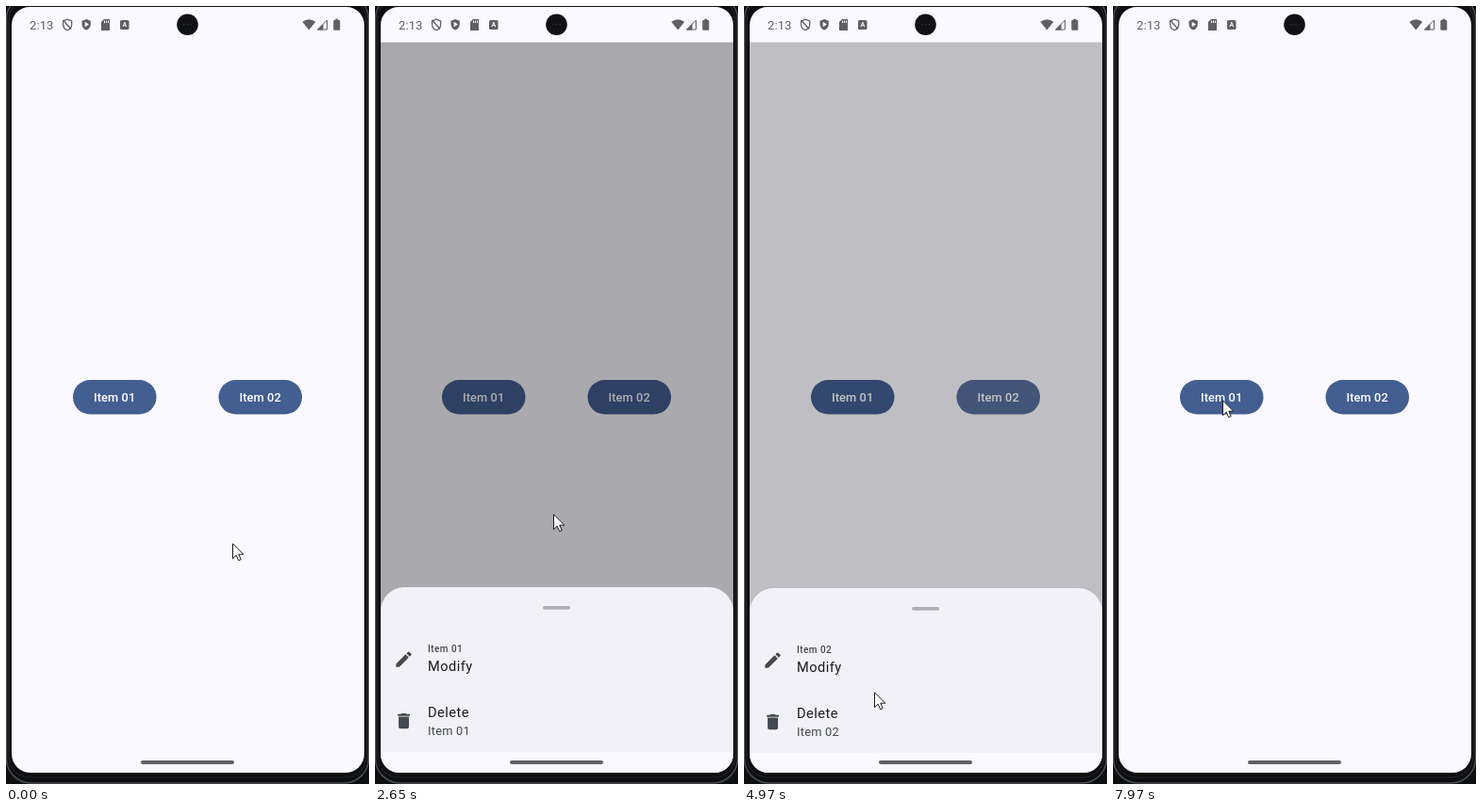
Recreate the animation shown at these times as an HTML page with a canvas. Size 385 by 826 pixels, loop 8000 ms.

```html
<!DOCTYPE html>
<html lang="en">
<head>
<meta charset="utf-8">
<title>Bottom sheet demo</title>
<style>
  html, body { margin: 0; width: 385px; height: 826px; overflow: hidden; background: #0d0e10; }
  canvas { display: block; }
</style>
</head>
<body>
<canvas id="stage" width="385" height="826"></canvas>
<script>
const ctx = document.getElementById('stage').getContext('2d');
const LOOP = 8000;
const BG = '#faf9ff', GREY = '#5f5f64', INK = '#1a1b20', SOFT = '#44474f';
const SHEET_TOP = 617, SHEET_OUT = 826, SHEET_H = 175;

// Pointer tip: time, x, y
const path = [
  [370, 240, 570], [1170, 162, 442], [1290, 151, 430], [1560, 119, 418],
  [2060, 119, 418], [2650, 189, 539], [3330, 189, 539], [3510, 214, 502],
  [3980, 259, 420], [4640, 259, 420], [4970, 138, 728], [5230, 92, 738],
  [5770, 82, 706], [6250, 194, 561], [6450, 194, 561], [7050, 182, 539],
  [7510, 182, 539], [7970, 116, 418]
];
const visits = [
  { name: 'Item 01', up: 1960, dim: 2070, down: 3351, clear: 3384 },
  { name: 'Item 02', up: 4700, dim: 4900, down: 7490, clear: 7520 }
];
const buttons = [
  { name: 'Item 01', x: 71, press: 1740, fade: 2200 },
  { name: 'Item 02', x: 225.5, press: 4480, fade: 5000 }
];
const clicks = [[1740, 1850], [3250, 3320], [4480, 4590], [7370, 7510]];

const icons = {
  edit: new Path2D('M3 17.25V21h3.75L17.81 9.94l-3.75-3.75zM20.71 7.04a1 1 0 0 0 0-1.41l-2.34-2.34a1 1 0 0 0-1.41 0l-1.83 1.83 3.75 3.75z'),
  bin: new Path2D('M6 19a2 2 0 0 0 2 2h8a2 2 0 0 0 2-2V7H6zM19 4h-3.5l-1-1h-5l-1 1H5v2h14z'),
  shield: new Path2D('M12 2 4 5v6c0 5 3.4 9.700 8 11 4.600-1.300 8-6 8-11V5z'),
  arrow: new Path2D('M.5 .8V16.700L4.200 13.200 6.700 18.700 9.200 17.600 6.800 12.200H11.800Z')
};

const clamp = v => Math.max(0, Math.min(1, v));
const span = (t, from, len) => clamp((t - from) / len);

// Fast-out, slow-in curve: cubic-bezier(.4, 0, .2, 1)
function ease(x) {
  let lo = 0, hi = 1, u = .5;
  for (let i = 0; i < 16; i++) {
    u = (lo + hi) / 2;
    const v = 1 - u;
    if (1.2 * v * v * u + .6 * v * u * u + u * u * u < x) lo = u; else hi = u;
  }
  return 3 * u * u - 2 * u * u * u;
}

// Motion advances at 15 steps per second
function stepTime(t) {
  const base = Math.floor(t / 200) * 200, r = t - base;
  const marks = t < 2600 ? [30, 90, 170] : [50, 110, 170];
  const hit = marks.filter(m => m <= r).pop();
  return hit === undefined ? Math.max(0, base - 30) : base + hit;
}

function pointer(t) {
  const i = path.findIndex(p => p[0] > t);
  if (i === 0) return path[0].slice(1);
  if (i < 0) return path[path.length - 1].slice(1);
  const [a, x, y] = path[i - 1], [b, x2, y2] = path[i];
  const k = (t - a) / (b - a);
  return [x + (x2 - x) * k, y + (y2 - y) * k];
}

function box(x, y, w, h, r, color) {
  ctx.beginPath();
  ctx.roundRect(x, y, w, h, r);
  ctx.fillStyle = color;
  ctx.fill();
}

function disc(x, y, r, color) {
  ctx.beginPath();
  ctx.arc(x, y, r, 0, Math.PI * 2);
  ctx.fillStyle = color;
  ctx.fill();
}

function poly(points, color) {
  ctx.beginPath();
  points.forEach(([x, y]) => ctx.lineTo(x, y));
  ctx.closePath();
  ctx.fillStyle = color;
  ctx.fill();
}

function text(s, x, y, size, color, { weight = 400, gap = 0, align = 'left' } = {}) {
  ctx.font = `${weight} ${size}px Roboto, sans-serif`;
  ctx.letterSpacing = gap + 'px';
  ctx.textAlign = align;
  ctx.fillStyle = color;
  ctx.fillText(s, x, y);
}

function icon(shape, x, y, scale, color, line) {
  ctx.save();
  ctx.translate(x, y);
  ctx.scale(scale, scale);
  if (line) {
    ctx.strokeStyle = color;
    ctx.lineWidth = line;
    ctx.stroke(shape);
  } else {
    ctx.fillStyle = color;
    ctx.fill(shape);
  }
  ctx.restore();
}

function drawCase() {
  ctx.fillStyle = '#0d0e10';
  ctx.fillRect(0, 0, 385, 826);
  ctx.strokeStyle = '#4c4d53';
  ctx.lineWidth = 1.5;
  ctx.beginPath();
  ctx.roundRect(.5, -12, 384, 837, 26);
  ctx.stroke();
  ctx.strokeStyle = '#26272b';
  ctx.lineWidth = 1;
  ctx.beginPath();
  ctx.roundRect(3, -8, 379, 827, 22);
  ctx.stroke();
}

function drawStatus() {
  text('2:13', 25, 25, 13, GREY, { gap: .1 });
  icon(icons.shield, 58.3, 13, .57, GREY, 2.2);
  ctx.strokeStyle = GREY;
  ctx.lineWidth = 1.3;
  ctx.beginPath();
  ctx.moveTo(60.5, 15);
  ctx.lineTo(69, 24.5);
  ctx.stroke();
  icon(icons.shield, 78.2, 12.8, .58, GREY);
  poly([[83.7, 16.800], [83.7, 22.2], [88, 19.5]], BG);
  poly([[104, 14], [110, 14], [110, 26], [101, 26], [101, 17]], GREY);
  [104, 106, 108].forEach(x => {
    ctx.fillStyle = BG;
    ctx.fillRect(x, 15.5, 1, 2.5);
  });
  box(121, 15, 9.5, 10, 1.5, GREY);
  text('A', 125.8, 22.4, 7, BG, { weight: 700, align: 'center' });

  ctx.beginPath();
  ctx.moveTo(321.3, 25.5);
  ctx.lineTo(314.3, 16.800);
  ctx.quadraticCurveTo(321.3, 11.5, 328.3, 16.800);
  ctx.fillStyle = GREY;
  ctx.fill();
  ctx.strokeStyle = GREY;
  ctx.lineWidth = 1;
  ctx.beginPath();
  ctx.moveTo(330.5, 25);
  ctx.lineTo(340.5, 25);
  ctx.lineTo(340.5, 15);
  ctx.closePath();
  ctx.stroke();
  poly([[330, 25.5], [336.5, 25.5], [336.5, 18.800]], GREY);
  box(347.3, 15, 7, 10.8, 1, GREY);
  box(349.3, 13.7, 3, 2, 0, GREY);

  disc(192.5, 19.7, 11.3, '#101114');
  [188.8, 192.5, 196.2].forEach(x => disc(x, 19.7, .8, '#34353a'));
}

function drawButton(b, t) {
  ctx.save();
  box(b.x, 397, 88.5, 36.5, 18.25, '#435e91');
  if (t >= b.press && t < b.fade + 200) {
    ctx.clip();
    const [x, y] = pointer(b.press);
    const a = .1 * (1 - span(t, b.fade, 200));
    disc(x, y, 10 + 80 * ease(span(t, b.press, 225)), `rgba(255,255,255,${a})`);
  }
  ctx.restore();
  text(b.name, b.x + 44.2, 419.8, 12.8, '#fff', { weight: 500, gap: .1, align: 'center' });
}

function drawSheet(name, y) {
  box(6, y, 374, SHEET_H, [25.5, 25.5, 0, 0], '#f2f1f8');
  ctx.fillStyle = BG;
  ctx.fillRect(6, y + SHEET_H, 374, 40);
  box(178, y + 20, 29, 3.7, 1.8, '#adaeb4');
  icon(icons.edit, 19.6, y + 65.7, .91, SOFT);
  icon(icons.bin, 19.6, y + 131.2, .91, SOFT);
  text(name, 56, y + 69, 10, SOFT, { weight: 500, gap: .45 });
  text('Modify', 56, y + 89, 14.6, INK, { gap: .46 });
  text('Delete', 56, y + 138, 14.6, INK, { gap: .46 });
  text(name, 56, y + 157, 12.8, SOFT, { gap: .23 });
}

function drawPointer(t) {
  const [x, y] = pointer(t).map(Math.round);
  if (clicks.some(([a, b]) => t >= a && t < b)) disc(x, y, 12, 'rgba(255,255,0,.47)');
  icon(icons.arrow, x, y, 1, '#fff');
  icon(icons.arrow, x, y, 1, '#17171a', 1);
}

function draw(t) {
  drawCase();
  ctx.save();
  box(6, 1, 374, 813, [19, 19, 20, 20], BG);
  ctx.clip();
  buttons.forEach(b => drawButton(b, t));
  for (const v of visits) {
    const dim = ease(span(t, v.dim, 150)) - ease(span(t, v.clear, 300));
    const rise = ease(span(t, v.up, 300)) - ease(span(t, v.down, 300));
    if (dim > 0) {
      ctx.fillStyle = `rgba(0,0,0,${.32 * dim})`;
      ctx.fillRect(6, 38.5, 374, 753.5);
    }
    if (rise > .001) drawSheet(v.name, Math.round(SHEET_OUT + (SHEET_TOP - SHEET_OUT) * rise));
  }
  box(143, 801, 99, 4, 2, GREY);
  drawStatus();
  ctx.restore();
  drawPointer(t);
}

const start = performance.now();
function tick() {
  draw(stepTime((performance.now() - start) % LOOP));
  requestAnimationFrame(tick);
}
tick();
</script>
</body>
</html>
```
